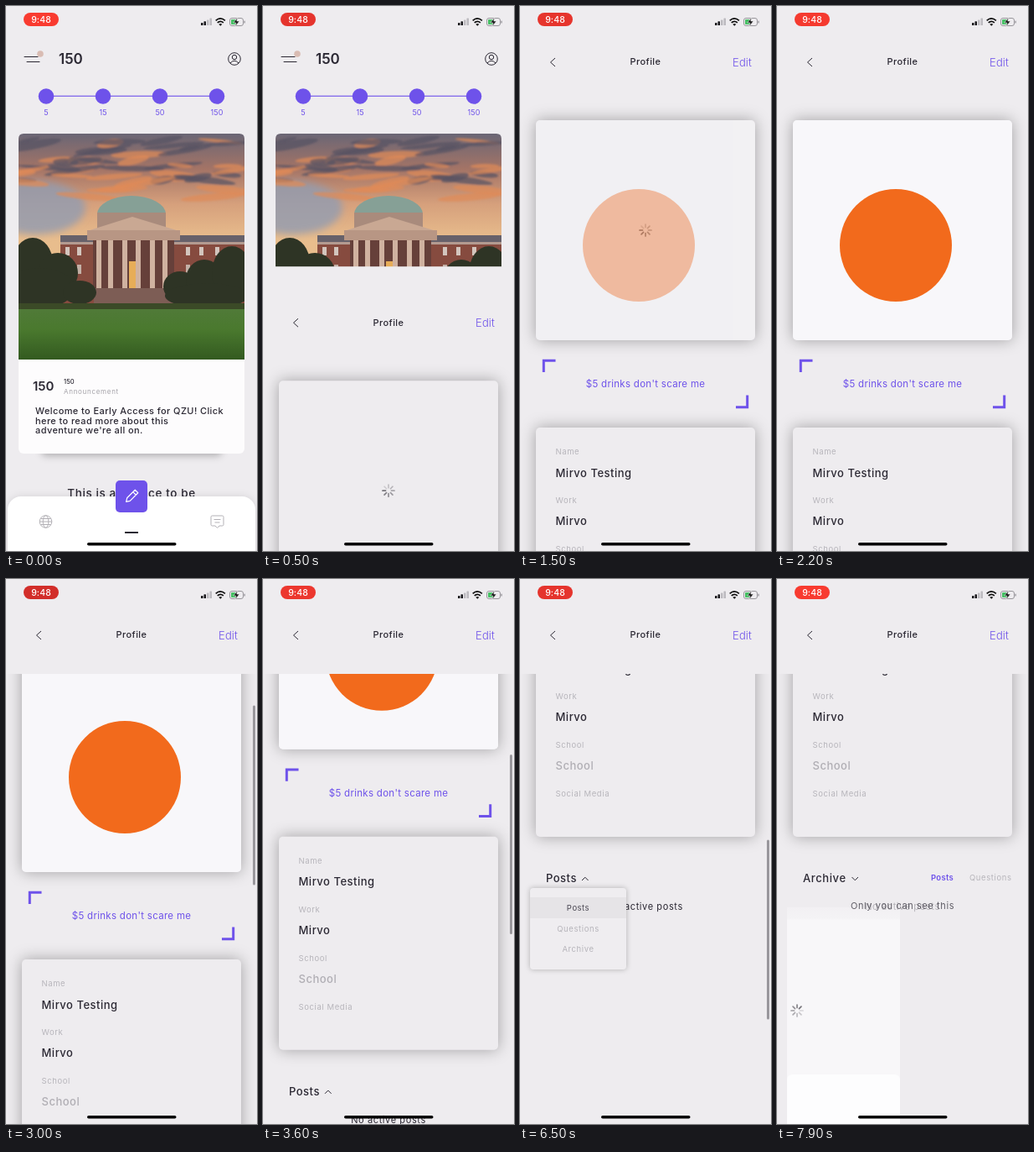
Animation of 300 by 649 pixels, one loop 8000 ms. Source, as an HTML page:

```html
<!DOCTYPE html>
<html lang="en">
<head>
<meta charset="utf-8">
<title>Profile walkthrough</title>
<style>
html, body { margin: 0; height: 100%; overflow: hidden; background: #eeecef; }
svg { display: block; width: 100vw; height: 100vh; font-family: Inter, "Open Sans", sans-serif; }
.card { filter: drop-shadow(0 0 9px rgba(0, 0, 0, .32)); }
.line { fill: none; stroke: #2b2833; stroke-width: 1; }
</style>
</head>
<body>
<svg id="stage" viewBox="0 0 300 649"></svg>
<script>
const LOOP = 8000;
const BG = '#eeecef', INK = '#2b2833', PALE = '#b7b5bb', ACCENT = '#6e52ea';

// y is the middle of the capitals
const text = (x, y, size, str, fill = INK, weight = 400, gap = .6, anchor = 'start', id = '') =>
  `<text ${id && `id="${id}"`} x="${x}" y="${y + size * .36}" font-size="${size}" fill="${fill}"
    font-weight="${weight}" letter-spacing="${gap}" text-anchor="${anchor}">${str}</text>`;
const rect = (x, y, w, h, fill, r = 0, more = '') =>
  `<rect x="${x}" y="${y}" width="${w}" height="${h}" rx="${r}" fill="${fill}" ${more}/>`;
const circle = (x, y, r, fill, more = '') => `<circle cx="${x}" cy="${y}" r="${r}" fill="${fill}" ${more}/>`;
const ellipse = (x, y, rx, ry, fill, more = '') =>
  `<ellipse cx="${x}" cy="${y}" rx="${rx}" ry="${ry}" fill="${fill}" ${more}/>`;
const path = (d, more = 'class="line"') => `<path d="${d}" ${more}/>`;
const each = (list, fn) => list.map(fn).join('');
const range = n => [...Array(n).keys()];

let seed = 7;
const random = (low, high) => {
  seed = seed * 16807 % 2147483647;
  return low + (high - low) * seed / 2147483647;
};

const spinner = (x, y) => `<g transform="translate(${x} ${y})"><g class="spin">` + each(range(8), i =>
  path('M0-3.5V-7', `stroke="#77757b" stroke-width="1.7" stroke-linecap="round"
    opacity="${1 - i * .105}" transform="rotate(${90 - i * 45})"`)) + '</g></g>';

// dark streaks high up, warm ones throughout
const clouds = each(range(48), i => {
  const warm = i % 2, x = random(15, 285), y = random(152, warm ? 228 : 212);
  return ellipse(x, y, random(14, 40), random(2, 5), warm ? '#e08a58' : '#565263',
    `opacity=".7" transform="rotate(${random(-14, 8)} ${x} ${y})"`);
});

const photo = `<g clip-path="url(#photoBox)">
  ${rect(15, 152, 270, 210, 'url(#sky)')}
  <g filter="url(#soft)">${ellipse(35, 240, 60, 32, '#929db2', 'opacity=".8"')}</g>
  <g filter="url(#mist)">${clouds}</g>
  ${rect(65, 279, 220, 75, '#864b3f')}${rect(65, 273, 220, 8, '#67616a')}${rect(65, 281, 220, 3, '#b39a90')}
  ${each([71, 85, 215, 231, 250, 268], x => rect(x, 287, 5, 10, '#d3c5bd') + rect(x, 308, 5, 11, '#c3b0a6'))}
  ${ellipse(150, 248, 41, 22, '#86a096')}${rect(109, 246, 82, 20, '#a98b7c')}
  ${rect(104, 278, 97, 60, '#66403a')}
  ${path('M97 268L151 251L207 268Z', 'fill="#c9a893"')}${rect(97, 267, 111, 12, '#b89684')}
  ${rect(147, 304, 9, 32, '#e7ad58')}
  ${each([108, 122, 139, 155, 172, 187], x => rect(x, 279, 6, 58, '#d0b2a0'))}
  ${rect(105, 336, 98, 18, '#7d5d55')}
  ${each([[32, 306, 24, 30], [62, 318, 24, 24], [40, 336, 42, 24], [88, 341, 20, 14],
    [208, 334, 20, 18], [237, 326, 22, 24], [270, 318, 24, 32], [240, 345, 50, 15]],
    ([x, y, rx, ry]) => ellipse(x, y, rx, ry, '#2e3425'))}
  ${rect(15, 354, 270, 10, '#3b4a27')}${rect(15, 361, 270, 60, 'url(#lawn)')}
</g>`;

const home = `
  ${path('M22 60.5H38M25 66.5H40', 'class="line" stroke-linecap="round"')}${circle(41, 57, 3.8, '#d9bcb3')}
  ${text(63, 63, 17, 150, INK, 600, 0)}
  ${circle(273, 63, 7.3, 'none', 'class="line"')}${circle(273, 61, 2.7, 'none', 'class="line"')}
  ${path('M268 68Q273 62.5 278 68')}
  ${rect(48, 106.7, 204, 1.1, ACCENT)}
  ${each([5, 15, 50, 150], (n, i) => circle(48 + 68 * i, 107.5, 9.3, ACCENT) + text(48 + 68 * i, 126.3, 9, n, ACCENT, 400, .1, 'middle'))}
  ${rect(42, 490, 216, 46, 'rgba(0,0,0,.25)', 6, 'filter="url(#soft)"')}
  ${rect(15, 152, 270, 381, '#fdfcfd', 6)}
  ${photo}
  ${text(32, 453, 15, 150, INK, 600, 0)}${text(69, 447, 7.5, 150, INK, 500, .1)}
  ${text(69, 459.5, 8, 'Announcement', '#a5a3a9', 400, .7)}
  ${each(['Welcome to Early Access for QZU! Click', 'here to read more about this', 'adventure we\'re all on.'],
    (s, i) => text(35, 482 + 11.6 * i, 11, s, INK, 500, .4))}
  ${text(150, 580, 13.5, 'This is a chance to be', INK, 500, .6, 'middle')}
  ${rect(2, 584, 296, 90, '#fff', 16, 'style="filter:drop-shadow(0 0 5px rgba(0,0,0,.1))"')}
  ${rect(131, 565, 38, 38, ACCENT, 5)}
  <g transform="translate(150 584) rotate(45)">${path('M-2.5-8.5H2.5V5L0 9L-2.5 5ZM-2.5-5H2.5', 'fill="none" stroke="#fff" stroke-width="1.2" stroke-linejoin="round"')}</g>
  <g fill="none" stroke="#b3b1b6">${circle(47.5, 614, 7.3, 'none')}${ellipse(47.5, 614, 3.3, 7.3, 'none')}
    ${path('M40 614H55M41.5 610.5H53.5M41.5 617.5H53.5', '')}
    ${path('M246.5 607H258.5Q260 607 260 608.5V617.5Q260 619 258.5 619H255L252.5 621.5L250 619H246.5Q245 619 245 617.5V608.5Q245 607 246.5 607ZM248.5 611.5H256.5M249.5 615H255.5', '')}</g>
  ${rect(142, 626, 16, 2, INK)}`;

const field = (y, label, before, after) => text(42.5, y, 9.5, label, PALE, 400, .6) +
  `<g class="empty">${text(42.5, y + 25, 13, before, '#b0aeb4', 500)}</g>` +
  `<g class="loaded">${text(42.5, y + 25, 13, after || before, after ? INK : '#b0aeb4', 500, .5)}</g>`;
const corner = d => path(d, `fill="none" stroke="${ACCENT}" stroke-width="3"`);

const profile = `
  ${rect(0, 0, 300, 660, BG)}
  ${path('M42 62L36.5 67L42 72')}
  ${text(150, 66.5, 11, 'Profile', INK, 500, .4, 'middle')}${text(277, 67.3, 13, 'Edit', ACCENT, 300, .1, 'end')}
  <g clip-path="url(#view)"><g id="scroll">
    ${rect(19, 136, 262, 262, BG, 5, 'class="card"')}
    ${spinner(150, 267)}
    <g id="picture">${rect(19, 136, 262, 262, '#f8f7fa', 5)}${circle(142, 285, 67, '#f26a1c')}</g>
    ${corner('M28.3 436V422.3H42.5')}
    <g class="empty">${text(150, 450, 11.5, 'What\'s happening here and', '#c3c1c6', 400, .6, 'middle')}
      ${text(150, 465, 11.5, 'now?', '#c3c1c6', 400, .6, 'middle')}</g>
    <g class="loaded">${text(150, 450, 11.5, '$5 drinks don\'t scare me', ACCENT, 400, .3, 'middle')}</g>
    <g id="lower">
      ${corner('M258 477.8H271.7V463.5')}
      ${rect(19, 502, 262, 254, BG, 5, 'class="card"')}
      ${field(531, 'Name', 'Full Name', 'Mirvo Testing')}
      ${field(588.7, 'Work', 'Workplace', 'Mirvo')}
      ${field(646.4, 'School', 'School')}
      ${text(42.5, 704.3, 9.5, 'Social Media', PALE)}
      <g id="posts">${text(31, 805.5, 13, 'Posts', INK, 500, .5)}${path('M74 808L77.8 804.2L81.6 808')}</g>
      <g id="archive">${text(31, 805.5, 13, 'Archive', INK, 500)}${path('M89.5 804L93.3 807.8L97 804')}
        ${text(184, 805, 9.5, 'Posts', ACCENT, 600, .3)}${text(230, 805, 9.5, 'Questions', PALE)}</g>
      <g id="results">
        ${rect(12, 840, 135, 220, 'url(#sheet)')}${rect(12, 1039, 135, 80, '#fdfdfe', 6)}
        ${spinner(24, 963)}
      </g>
      ${text(150, 839.5, 11, 'No active posts', INK, 400, .6, 'middle', 'none')}
      ${text(150, 838.5, 11, 'Only you can see this', INK, 400, .6, 'middle', 'only')}
      <g id="menu">
        ${rect(12, 817, 115, 97, '#efedf0', 4, 'style="filter:drop-shadow(0 0 3px rgba(0,0,0,.26))"')}
        ${rect(12, 828, 115, 25, '#e6e4e7')}
        ${text(69.5, 841, 9.5, 'Posts', '#4b4853', 400, .5, 'middle')}
        ${text(69.5, 865.5, 9.5, 'Questions', PALE, 400, .6, 'middle')}
        ${text(69.5, 890, 9.5, 'Archive', PALE, 400, .6, 'middle', 'choice')}
      </g>
    </g>
  </g></g>
  ${rect(295, 131, 3, 214, '#99979c', 1.5, 'id="bar"')}`;

const status = `
  ${rect(21, 8, 42, 16, '#f93b30', 8, 'id="pill"')}${text(42, 16.2, 10.5, '9:48', '#fff', 500, .1, 'middle')}
  ${each(range(4), i => rect(233 + 3.5 * i, 20 - 1.8 * i, 2.5, 3 + 1.8 * i, i < 2 ? '#19181c' : '#bcbabf', .6))}
  <g fill="none" stroke="#111" stroke-width="1.7">${path('M250.7 17.3Q256.3 12.4 261.9 17.3M252.7 19.9Q256.3 16.8 259.9 19.9', '')}</g>
  ${path('M254.3 21.8Q256.3 20.2 258.3 21.8L256.3 23.8Z', 'fill="#111"')}
  ${rect(267.5, 14.5, 16, 9, 'none', 2.5, 'stroke="#8f8d92" stroke-width=".9"')}${rect(284.5, 17.5, 1.2, 3, '#8f8d92', .6)}
  ${rect(269, 16, 6, 6, '#45bf63', 1)}${path('M276.8 13.8L271.8 20H275L273.8 24.4L279 18H275.8Z', `fill="#111" stroke="${BG}" stroke-width=".6"`)}
  ${rect(97, 639, 106.5, 3.6, '#000', 1.8)}`;

const gradient = (id, stops) => `<linearGradient id="${id}" x2="0" y2="1">${each(stops, ([o, c]) =>
  `<stop offset="${o}" stop-color="${c}"/>`)}</linearGradient>`;
const blur = (id, size) => `<filter id="${id}" x="-30%" y="-60%" width="160%" height="220%"><feGaussianBlur stdDeviation="${size}"/></filter>`;

const $ = id => document.getElementById(id);
$('stage').innerHTML = `<defs>
  ${gradient('sky', [[0, '#6a6675'], [.2, '#a47466'], [.4, '#d6a07c'], [.6, '#e8bd8d'], [1, '#e8bd8d']])}
  ${gradient('lawn', [[0, '#507a38'], [.4, '#4a792e'], [1, '#335a20']])}
  ${gradient('sheet', [[0, '#f2f0f3'], [.06, '#f4f3f5'], [.07, '#f8f7f9'], [1, '#f8f7f9']])}
  ${blur('soft', 4)}${blur('mist', 1.3)}
  <clipPath id="photoBox">${path('M15 421V158Q15 152 21 152H279Q285 152 285 158V421Z', '')}</clipPath>
  <clipPath id="view">${rect(0, 113, 300, 560, '#000')}</clipPath>
</defs>${rect(0, 0, 300, 649, BG)}<g>${home}</g><g id="profile">${profile}</g>${status}`;

const ramp = (t, a, b) => Math.min(1, Math.max(0, (t - a) / (b - a)));
const smooth = p => p * p * (3 - 2 * p);
const fade = (id, value) => $(id).setAttribute('opacity', value);
const move = (id, y) => $(id).setAttribute('transform', `translate(0 ${y})`);
const show = (cls, on) => document.querySelectorAll(cls).forEach(e => e.setAttribute('opacity', +on));

// [time, distance] stops of the scrolling finger
const stops = [[2800, 0], [3600, 195], [4450, 345], [5000, 357], [5500, 449]];
const scrolled = t => stops.slice(1).reduce((y, [end, to], i) => {
  const [start, from] = stops[i];
  return y + (to - from) * ramp(t, start, end);
}, 0);

function draw(t) {
  const glow = (1 + Math.cos(t * Math.PI / 1000)) / 2;
  $('pill').setAttribute('fill', `rgb(${210 + 39 * glow},${46 + 13 * glow},${42 + 6 * glow})`);

  move('profile', 649 * (1 - ramp(t, 380, 1000)) ** 3.4);
  const loaded = t >= 1300;
  show('.empty', !loaded);
  show('.loaded', loaded);
  move('lower', loaded ? 0 : 15);
  fade('picture', ramp(t, 1350, 1750));

  const y = scrolled(t);
  move('scroll', -y);
  move('bar', y * .4);
  fade('bar', ramp(t, 2780, 2880) * (1 - ramp(t, 7300, 7600)));

  fade('menu', smooth(ramp(t, 5950, 6200)) * (1 - smooth(ramp(t, 7350, 7600))));
  fade('choice', 1 - .6 * ramp(t, 7000, 7100));
  const archived = t >= 7500;
  fade('posts', +!archived);
  fade('archive', +archived);
  fade('results', ramp(t, 7600, 7850));
  const swap = ramp(t, 7650, 8000);
  fade('none', 1 - swap);
  fade('only', swap);

  document.querySelectorAll('.spin').forEach(e =>
    e.setAttribute('transform', `rotate(${45 * Math.floor(t / 125)})`));
}

const begin = performance.now();
function tick() {
  draw((performance.now() - begin) % LOOP);
  requestAnimationFrame(tick);
}
tick();
</script>
</body>
</html>
```
